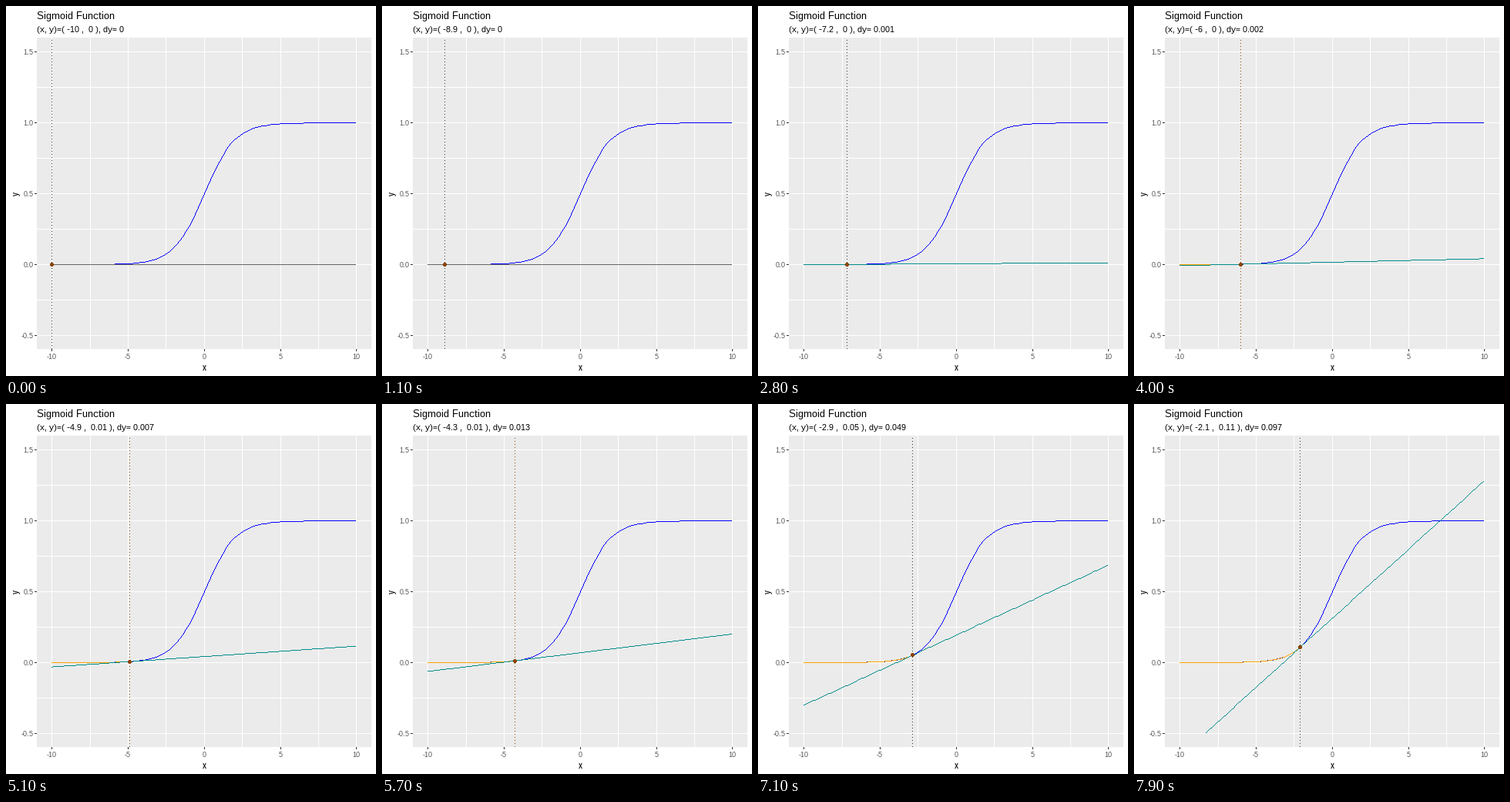
These frames come from a looping animation (480 px wide and 480 px high, 8000 ms). A matplotlib script:

```python
import numpy as np
import matplotlib.pyplot as plt
from matplotlib.animation import FuncAnimation

plt.rcParams["font.family"] = ["Liberation Sans", "DejaVu Sans"]
plt.rcParams["text.hinting"] = "native"
plt.rcParams["text.hinting_factor"] = 1

SIZE, DPI = 480, 72          # at 72 dpi one point is one pixel
FRAMES, STEP_MS = 80, 100
LEFT, RIGHT, TOP, BOTTOM = 40, 474, 41, 445

BLUE, ORANGE, TEAL = (0, 0, 255), (255, 165, 0), (0, 139, 139)
BROWN, GREY, DARK = (139, 69, 0), (102, 102, 102), (51, 51, 51)
WHITE, PANEL = (255, 255, 255), (235, 235, 235)


def px(x):
    return np.floor(59.93 + 19.74 * (np.asarray(x) + 10)).astype(int)


def py(y):
    return np.floor(335.53 - 183.79 * np.asarray(y)).astype(int)


def sigmoid(x):
    return 1 / (1 + np.exp(-x))


def fmt(value, digits):
    return f"{round(float(value), digits) + 0.0:g}"


def polyline(img, xs, ys, color):
    """Hard-edged one-pixel line; the last pixel stays open."""
    cols, rows = px(xs), py(ys)
    for x0, y0, x1, y1 in zip(cols, rows, cols[1:], rows[1:]):
        n = max(abs(x1 - x0), abs(y1 - y0), 1)
        t = np.arange(n) / n
        col = np.floor(x0 + t * (x1 - x0) + 0.5).astype(int)
        row = np.floor(y0 + t * (y1 - y0) + 0.5).astype(int)
        img[row, col] = color


def disc(img, x, y, color):
    dy, dx = np.mgrid[-2:3, -2:3]
    inside = dx ** 2 + dy ** 2 <= 5
    img[y + dy[inside], x + dx[inside]] = color


x_ticks = np.arange(-10, 11, 5)
y_ticks = np.arange(-0.5, 1.6, 0.5)
fine = np.linspace(-10, 10, 201)
coarse = np.linspace(-10, 10, 101)


def make_base():
    img = np.full((SIZE, SIZE, 3), 255, np.uint8)
    img[TOP:BOTTOM, LEFT:RIGHT] = PANEL
    img[TOP:BOTTOM, px(np.arange(-10, 10.1, 2.5))] = WHITE
    img[py(np.arange(-0.5, 1.6, 0.25)), LEFT:RIGHT] = WHITE
    img[BOTTOM:BOTTOM + 3, px(x_ticks)] = DARK
    img[py(y_ticks), LEFT - 3:LEFT] = DARK
    polyline(img, coarse, sigmoid(coarse), BLUE)
    return img


fig = plt.figure(figsize=(SIZE / DPI, SIZE / DPI), dpi=DPI, facecolor="white")
ax = fig.add_axes([0, 0, 1, 1])
ax.axis("off")
base = make_base()
stage = ax.imshow(base, extent=(0, SIZE, SIZE, 0), interpolation="nearest",
                  aspect="auto")


def label(x, y, text, size, color="black", **kw):
    return ax.text(x, y, text, fontsize=size, color=color, **kw)


for t in x_ticks:
    label(px(t), 458.5, f"{t}", 9, "#4d4d4d", ha="center")
for t in y_ticks:
    label(35.5, py(t) + 4, f"{t:.1f}", 9, "#4d4d4d", ha="right")

label(40, 17, "Sigmoid Function", 13)
subtitle = label(40, 34, "", 11)
label(257, 473, "x", 11.5, ha="center")
label(18.5, 243, "y", 11.5, rotation=90, ha="right", va="center")


def update(i):
    x = fine[i]
    y = sigmoid(x)
    slope = y * (1 - y)
    img = base.copy()

    done = fine[:i + 1]
    polyline(img, done, sigmoid(done), ORANGE)

    ty = y + slope * (fine - x)
    keep = ty >= -0.5
    polyline(img, fine[keep], ty[keep], GREY if i < 20 else TEAL)

    img[BOTTOM - 1:TOP - 1:-4, px(x)] = BROWN if 34 <= i < 71 else DARK
    disc(img, px(x), py(y), BROWN)
    stage.set_data(img)
    subtitle.set_text(f"(x, y)=( {fmt(x, 1)} ,  {fmt(y, 2)} ), "
                      f"dy= {fmt(slope, 3)}")
    return stage, subtitle


anim = FuncAnimation(fig, update, frames=FRAMES, interval=STEP_MS,
                     repeat=True, repeat_delay=0, blit=False)
plt.show()
```
